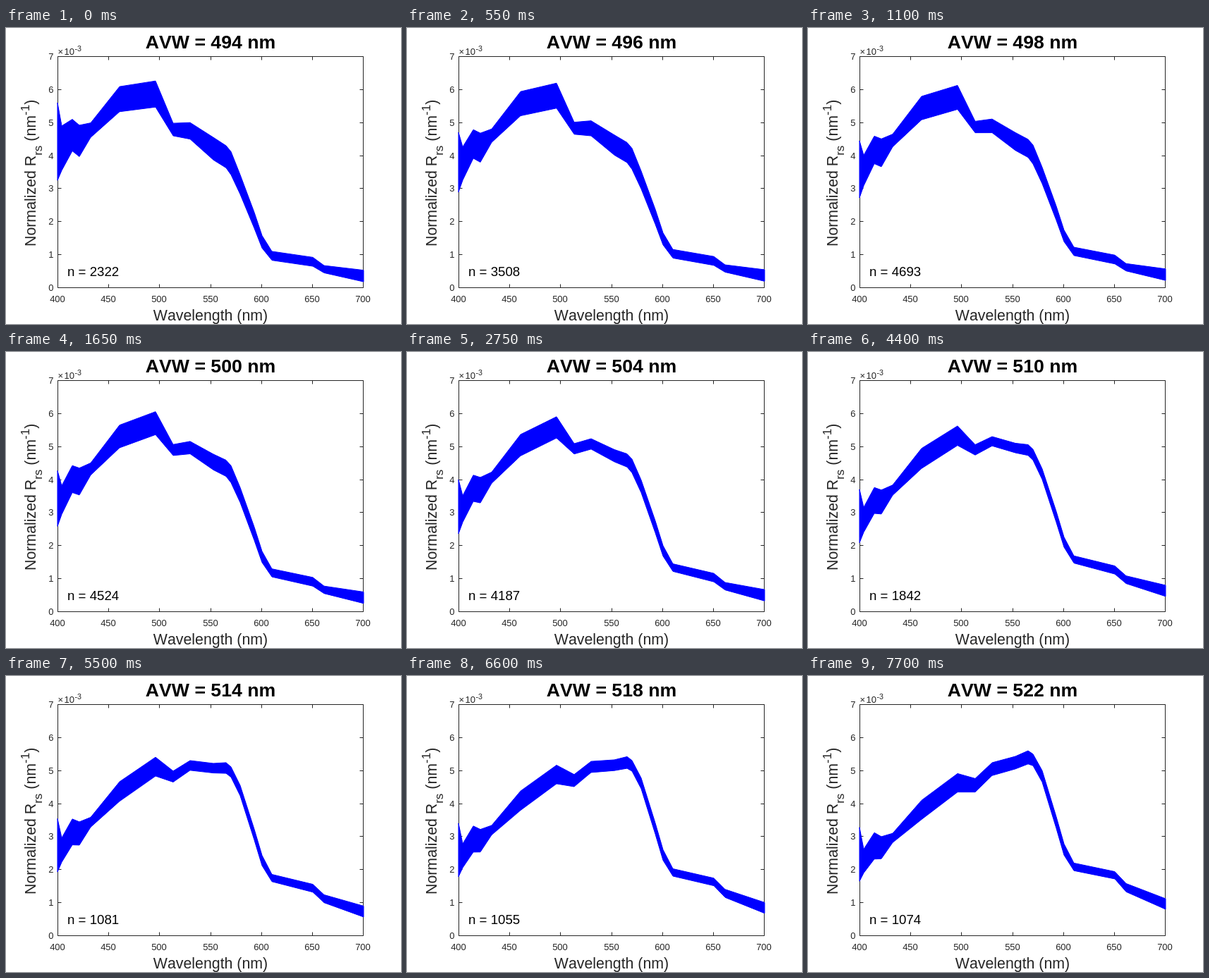
These frames come from a looping animation (560 px wide and 420 px high, 8000 ms). An HTML page:

```html
<!DOCTYPE html>
<html lang="en">
<head>
<meta charset="utf-8">
<title>Normalized spectra by wavelength</title>
<style>
  html, body { margin: 0; width: 100%; height: 100%; overflow: hidden; background: #fff; }
  svg { display: block; width: 560px; height: 420px; font-family: "Liberation Sans", Arial, sans-serif; font-kerning: none; }
  text { fill: #262626; white-space: pre; }
  .tick { font-size: 13px; }
  .label { font-size: 21.33px; }
  .small { font-size: 17px; }
  #title { font-size: 26.67px; font-weight: bold; fill: #000; }
  #count { font-size: 18.67px; fill: #000; }
  #axes { fill: none; stroke: #262626; stroke-width: 1; }
  #band { fill: #00f; stroke: #00f; stroke-width: 1; stroke-linejoin: round; }
</style>
</head>
<body>
<svg viewBox="0 0 560 420">
  <path id="axes"/>
  <polygon id="band"/>
  <g id="ticks"></g>
  <text class="tick" x="73.5" y="37.5">×<tspan dx="1.5">10</tspan><tspan dy="-5" dx="0.5" font-size="10.67">-3</tspan></text>
  <text id="title" x="290" y="29" text-anchor="middle"></text>
  <text id="count" x="87" y="352"></text>
  <text class="label" x="290" y="415" text-anchor="middle">Wavelength (nm)</text>
  <text class="label" transform="translate(42 310) rotate(-90)">Normalized R<tspan class="small" dy="9">rs</tspan><tspan dy="-9"> (nm</tspan><tspan class="small" dy="-9">-1</tspan><tspan dy="9">)</tspan></text>
</svg>
<script>
const LOOP = 8000, STEP = 550, LAST = 14;
const LEFT = 73.5, RIGHT = 506.5, TOP = 40.5, BOTTOM = 368.5;
const UNIT = (BOTTOM - TOP) / 7;
const byId = id => document.getElementById(id);
const clamp = v => Math.min(1, Math.max(0, v));

// Corners of the band: x, then top and low edge at the start and at the end
const corners = [
  [73, 5.6, 3.25, 3.28, 1.65], [79, 4.9, 3.55, 2.62, 1.9], [94, 5.1, 4.14, 3.12, 2.32],
  [104, 4.92, 3.97, 3, 2.33], [120, 4.99, 4.55, 3.1, 2.82], [161, 6.09, 5.33, 4.1, 3.52],
  [212, 6.26, 5.47, 4.91, 4.35], [237, 4.98, 4.6, 4.76, 4.35], [261, 5, 4.5, 5.24, 4.85],
  [294, 4.55, 3.87, 5.43, 5.05], [312, 4.3, 3.63, 5.6, 5.2], [319, 4.12, 3.42, 5.5, 5.15],
  [332, 3.42, 2.83, 5, 4.65], [352, 2.28, 1.8, 3.6, 3.25], [363, 1.58, 1.2, 2.78, 2.44],
  [377, 1.1, 0.83, 2.2, 1.97], [435, 0.92, 0.65, 1.94, 1.72], [451, 0.67, 0.45, 1.58, 1.33],
  [507, 0.53, 0.18, 1.12, 0.8]
];

// Short wavelengths change early (rush), the long tail late; the middle swells on the way
const topEdge = { from: 1, to: 3, rush: 0.64, swell: 0.21, centre: 240, width: 45 };
const lowEdge = { from: 2, to: 4, rush: 0.43, swell: 0.33, centre: 262, width: 75 };

const countKeys = [[0, 2322], [2, 4693], [5, 4187], [7, 2223], [10, 1081], [12, 1055], [14, 1074]];

function countAt(step) {
  const next = Math.max(1, countKeys.findIndex(([at]) => at >= step));
  const [a, from] = countKeys[next - 1], [b, to] = countKeys[next];
  return Math.round(from + (to - from) * (step - a) / (b - a));
}

function edgePoints(edge, progress) {
  return corners.map(corner => {
    const x = corner[0], from = corner[edge.from], to = corner[edge.to];
    const power = 1 - edge.rush * Math.exp((73 - x) / 28) + 0.4 * clamp((x - 360) / 60);
    const bump = edge.swell * Math.exp(-(((x - edge.centre) / edge.width) ** 2));
    const value = from + (to - from) * progress ** power + bump * Math.sin(Math.PI * progress);
    return `${x},${(BOTTOM - value * UNIT).toFixed(2)}`;
  });
}

function drawAxes() {
  let path = `M${LEFT} ${TOP}H${RIGHT}V${BOTTOM}H${LEFT}Z`;
  let labels = '';
  for (let i = 0; i < 7; i++) {
    const x = Math.round(73 + i * 72.17) + 0.5;
    path += `M${x} ${TOP}v5M${x} ${BOTTOM}v-5`;
    labels += `<text class="tick" x="${x - 0.5}" y="388.5" text-anchor="middle">${400 + i * 50}</text>`;
  }
  for (let v = 0; v <= 7; v++) {
    const y = Math.round(BOTTOM - v * UNIT - 0.5) + 0.5;
    path += `M${LEFT} ${y}h5M${RIGHT} ${y}h-5`;
    labels += `<text class="tick" x="67.5" y="${y + 4.5}" text-anchor="end">${v}</text>`;
  }
  byId('axes').setAttribute('d', path);
  byId('ticks').innerHTML = labels;
}

function show(step) {
  const progress = step / LAST;
  const outline = [...edgePoints(topEdge, progress), ...edgePoints(lowEdge, progress).reverse()];
  byId('title').textContent = `AVW = ${494 + step * 2} nm`;
  byId('count').textContent = `n = ${countAt(step)}`;
  byId('band').setAttribute('points', outline.join(' '));
}

let shown = -1;
function tick() {
  const step = Math.floor(performance.now() % LOOP / STEP);
  if (step !== shown) show(shown = step);
  requestAnimationFrame(tick);
}

drawAxes();
tick();
</script>
</body>
</html>
```
